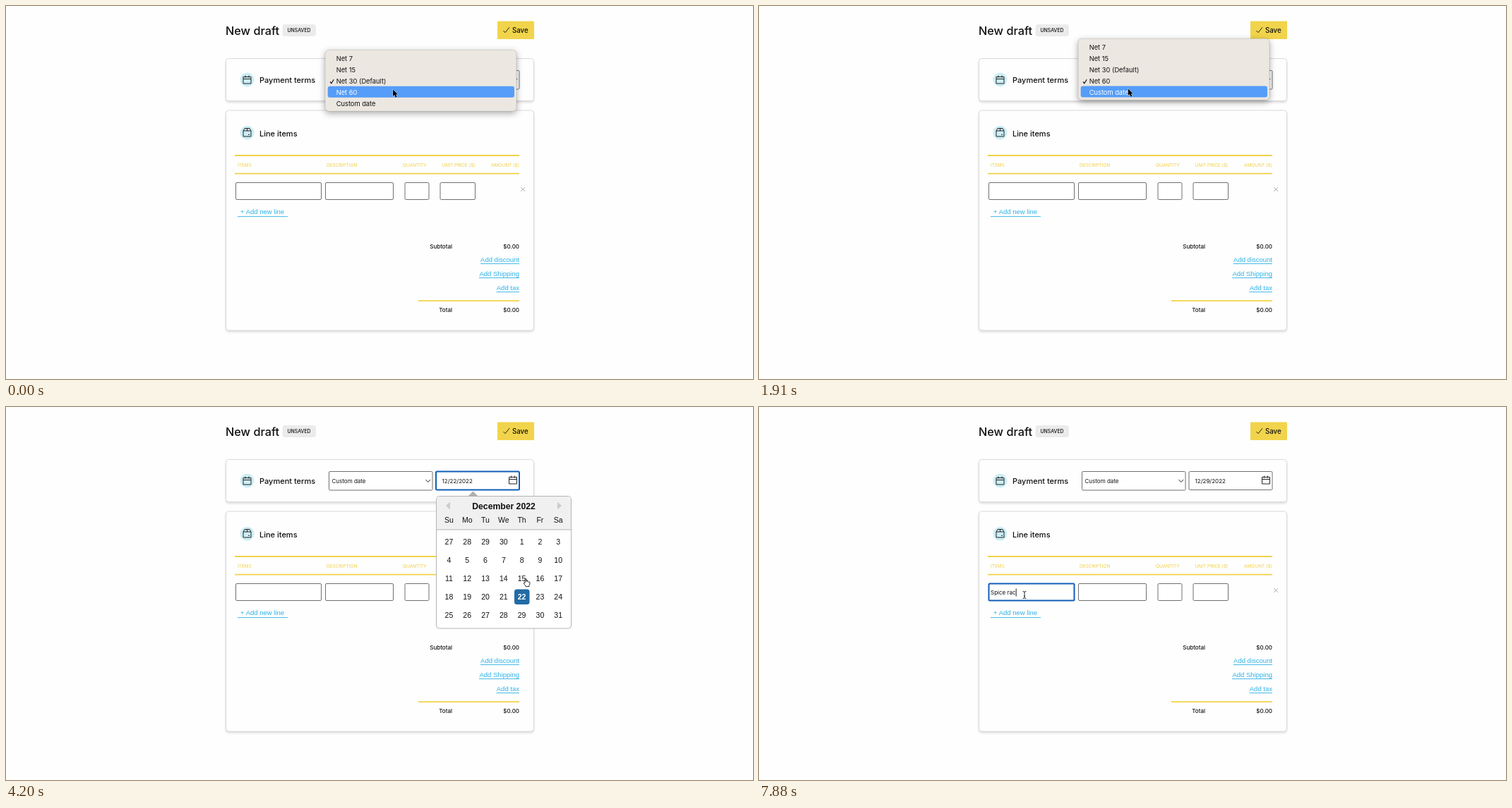
An HTML page that plays this animation: 1058x529 px, repeating every 8000 ms.

```html
<!DOCTYPE html>
<html lang="en">
<head>
<meta charset="utf-8">
<title>New draft</title>
<style>
html, body { margin: 0; width: 100%; height: 100%; overflow: hidden; background: #fefefe; }
svg { display: block; font-family: Inter, sans-serif; fill: #111; }
.arial { font-family: "Liberation Sans", Arial, sans-serif; }
.end { text-anchor: end; }
.mid { text-anchor: middle; }
.line { fill: none; stroke: #222; stroke-width: 1; }
.link { fill: #2fb2e6; font-size: 9.5px; }
.head { fill: #f2cf45; font-size: 6.5px; }
.small { font-size: 8px; font-weight: 500; }
.field { fill: #fff; stroke: #707070; stroke-width: 1; }
.field.hover { stroke: #333; }
.field.focus { stroke: #105fb8; stroke-width: 2; }
.card { fill: #fefefe; stroke: #dadada; filter: drop-shadow(0 2px 1.5px #0002); }
</style>
</head>
<body>
<svg id="stage" width="1058" height="529" viewBox="0 0 1058 529"></svg>
<script>
const LOOP = 8000;
const stage = document.getElementById('stage');

const text = (x, y, str, size, cls = '', extra = '') =>
  `<text x="${x}" y="${y}" class="${cls}" ${size ? `font-size="${size}"` : ''} ${extra}>${str}</text>`;
const rect = (x, y, w, h, r, attrs) =>
  `<rect x="${x}" y="${y}" width="${w}" height="${h}" rx="${r}" ${attrs}/>`;
const path = (d, attrs = 'class="line"') => `<path d="${d}" ${attrs}/>`;
const group = (id, body) => `<g id="${id}">${body}</g>`;
const field = (x, y, w, h, id = '') => rect(x, y, w, h, 1.5, `class="field" id="${id}"`);
const calIcon = (x, y) =>
  path(`M${x} ${y + 2}h11v9.5h-11zM${x} ${y + 5}h11M${x + 3} ${y}v3M${x + 8} ${y}v3`);
const rule = (x, y) => path(`M${x} ${y}H727`, 'stroke="#f1d24a" stroke-width="1.8"');

function link(y, str, width) {
  return text(727, y, str, 0, 'arial link end') +
    path(`M${727 - width} ${y + 2.5}H727`, 'stroke="#2fb2e6" stroke-width=".9"');
}

function page() {
  const heads = [[328, 'ITEMS'], [454, 'DESCRIPTION'], [562, 'QUANTITY'], [617.5, 'UNIT PRICE ($)']];
  return text(311, 41, 'New draft', 16.3, '', 'font-weight="500"') +
    rect(391.5, 26, 47.5, 17, 4, 'fill="#ebebeb"') +
    text(415, 37, 'UNSAVED', 6.9, 'mid', 'font-weight="500"') +
    rect(696, 21.5, 52, 25.5, 1, 'fill="#f1d44b"') +
    path('M704.5 35l2.5 2.7 6-7.5') +
    text(717, 38, 'Save', 9.7, '', 'font-weight="500"') +
    rect(311.5, 74.5, 436, 60, 4, 'class="card"') +
    rect(311.5, 148, 436, 312, 4, 'class="card"') +
    '<circle cx="341.5" cy="104.5" r="10" fill="#cdeef6"/><circle cx="341.5" cy="179.7" r="10" fill="#cdeef6"/>' +
    calIcon(336, 98.5) +
    path('M336 177l2-3.5h7l2 3.5v8h-11zM336 177h11M341.5 173.5v3.5M343 182.3h2') +
    text(359, 109, 'Payment terms', 11, '', 'font-weight="500"') +
    text(359, 184.5, 'Line items', 11, '', 'font-weight="500"') +
    rule(324, 212) + rule(324, 237.6) + rule(584, 418.2) +
    heads.map(([x, s]) => text(x, 228, s, 0, 'head')).join('') +
    text(727, 228, 'AMOUNT ($)', 0, 'head end') +
    field(325.5, 250.5, 121, 24, 'item') + field(452.5, 250.5, 96, 24) +
    field(565, 250.5, 34, 24) + field(615, 250.5, 49.5, 24) +
    path('M729 257l6 6M735 257l-6 6', 'stroke="#aaa" stroke-width=".9"') +
    text(332, 295.3, '+ Add new line', 0, 'arial link') +
    path('M328 298.6H399', 'stroke="#2fb2e6" stroke-width=".9"') +
    text(632, 344, 'Subtotal', 0, 'small end') + text(727, 344, '$0.00', 0, 'small end') +
    link(363, 'Add discount', 55) + link(383, 'Add Shipping', 57) + link(403, 'Add tax', 32.5) +
    text(632, 433.5, 'Total', 0, 'small end') + text(727, 433.5, '$0.00', 0, 'small end') +
    text(328, 266, '', 8, '', 'id="typed"') +
    rect(0, 257.5, .9, 11, 0, 'id="caret" fill="#111"');
}

function selects() {
  return field(457.5, 91.5, 269.5, 26.5, 'select') +
    text(461.5, 107.7, '', 8, '', 'id="chosen"') +
    group('chevron', path('M717.5 103l3.3 3.5 3.3-3.5')) +
    group('date', field(609, 91.5, 118, 26, 'dateBox') +
      text(617.5, 107.5, '', 8, '', 'id="dateText"') + calIcon(712.5, 97.5));
}

function menu() {
  const rows = ['Net 7', 'Net 15', 'Net 30 (Default)', 'Net 60', 'Custom date'];
  return rect(452, 0, 271, 87, 5, 'fill="#ece7e1" stroke="#0003" stroke-width=".6" style="filter:drop-shadow(0 3px 5px #0005)"') +
    rect(455.7, 0, 264.3, 16, 3, 'id="hot" fill="#559df8"') +
    rows.map((s, i) => text(467.7, 15.3 + 16 * i, s, 9.3, 'row')).join('') +
    path('M459 1l1.8 2.4 3.4-5.4', 'id="tick" fill="none" stroke="#111" stroke-width="1.2"');
}

function calendar() {
  const col = i => 627.4 + 25.8 * i;
  let out = rect(609.5, 126.5, 191, 187.5, 4, 'fill="#fff" stroke="#b4b4b4"') +
    path('M610 174V130q0-3 3-3H797q3 0 3 3V174z', 'fill="#f0f0f0"') +
    path('M610 174H800', 'stroke="#b4b4b4"') +
    path('M654.5 126.5l7-7 7 7z', 'fill="#aeaeae"') +
    path('M629 134.5v11l-6-5.5zM781 134.5v11l6-5.5z', 'fill="#ccc"') +
    text(705, 144.6, 'December 2022', 12.2, 'arial mid', 'font-weight="700"') +
    rect(720, 258.5, 21.5, 21.5, 3.5, 'fill="#216ba5"');
  ['Su', 'Mo', 'Tu', 'We', 'Th', 'Fr', 'Sa'].forEach((d, i) => out += text(col(i), 164, d, 10.5, 'arial mid'));
  for (let i = 0; i < 35; i++) {
    const day = i < 4 ? 27 + i : i - 3;
    out += text(col(i % 7), 195.3 + 25.9 * Math.floor(i / 7), day, 10.5, 'arial mid',
      day === 22 ? 'font-weight="700" style="fill:#fff"' : '');
  }
  return out;
}

function cursors() {
  const edge = 'fill="#fff" stroke="#111" stroke-width=".9" stroke-linejoin="round"';
  return group('arrow', path('M0 0V9.6L2.2 7.6 3.8 11.2 5.6 10.4 4.1 7H7z',
      'fill="#000" stroke="#fff" stroke-width=".8" paint-order="stroke"')) +
    group('beam', path('M-2.3-5Q0-5 0-3.7Q0-5 2.3-5M0-3.7V3.7M-2.3 5Q0 5 0 3.7Q0 5 2.3 5M-1 1.6H1')) +
    group('hand', path('M-.9 6.4V.9Q0-.4.9.9V4.4Q2-.0 2.6 4.6Q4 3.8 4.2 5.2Q6 4.6 5.9 6.4V8.2Q5.6 9.6 4.9 10.2V11.6H.2Q-.6 9.8-2.6 7.4Q-3.2 5.6-.9 6.4z', edge));
}

stage.innerHTML = page() + selects() + group('menu', menu()) + group('calendar', calendar()) + cursors();
const $ = id => document.getElementById(id);
const rows = [...stage.querySelectorAll('.row')];
const show = (id, on) => $(id).setAttribute('visibility', on ? 'visible' : 'hidden');
const place = (id, x, y) => $(id).setAttribute('transform', `translate(${x} ${y})`);
// last entry whose time has come
const at = (list, t) => list.findLast(e => e[0] <= t);

const pointer = [
  [0, 548, 118.5, 'arrow'], [620, 548.5, 117], [740, 547.5, 113], [860, 546, 108], [950, 545, 104.5],
  [1310, 541, 108], [1430, 533, 114.5], [1550, 526, 117], [1670, 522.7, 117.5],
  [2440, 535, 114], [2560, 574, 109], [2670, 612, 106, 'beam'], [2780, 632, 104.5, 'beam'], [2900, 638, 104.5, 'beam'],
  [3730, 648, 119], [3850, 672, 146, 'hand'], [3970, 702, 185, 'hand'], [4080, 726, 223, 'hand'],
  [4200, 736, 243, 'hand'], [4320, 739, 255, 'hand'], [4430, 740, 266, 'hand'],
  [4550, 739, 274, 'hand'], [4670, 736, 282, 'hand'], [4790, 732, 287, 'hand'], [4900, 729, 288.5, 'hand'],
  [5020, 728, 288.5], [5620, 708, 288.5], [5740, 620, 287], [5860, 505, 283],
  [5980, 410, 272, 'beam'], [6100, 376, 266.5, 'beam']
];
const fade = [[0, 1], [270, .6], [390, .17], [500, 0], [1070, 1], [2000, .8], [2120, .45], [2200, .15], [2320, 0]];
const keys = [[0, 0], [6810, 1], [7050, 2], [7290, 3], [7410, 4], [7530, 5], [7650, 7], [7770, 8], [7880, 9]];

function draw(t) {
  const second = t >= 1070;
  const custom = t >= 2320;

  const alpha = at(fade, t)[1];
  show('menu', alpha > 0);
  $('menu').setAttribute('opacity', alpha);
  place('menu', 0, second ? 46.3 : 62.3);
  const hot = second && t >= 1430 ? 4 : 3;
  const tick = second ? 3 : 2;
  $('hot').setAttribute('y', 3.7 + 15.9 * hot);
  rows.forEach((r, i) => r.style.fill = i === hot ? '#fff' : '#111');
  place('tick', 0, 12 + 16 * tick);
  $('tick').setAttribute('stroke', tick === hot ? '#fff' : '#111');

  $('chosen').textContent = custom ? 'Custom date' : t >= 500 ? 'Net 60' : 'Net 30 (Default)';
  $('select').setAttribute('width', custom ? 146.5 : 269.5);
  place('chevron', custom ? -123 : 0, 0);

  const picking = t >= 3380 && t < 5020;
  show('date', custom);
  show('calendar', picking);
  $('dateText').textContent = t < 5020 ? '12/22/2022' : '12/29/2022';
  $('dateBox').setAttribute('class', picking ? 'field focus' : t >= 2780 && t < 3380 ? 'field hover' : 'field');

  const typing = t >= 6340;
  const count = at(keys, t)[1];
  $('item').setAttribute('class', typing ? 'field focus' : t >= 5980 ? 'field hover' : 'field');
  $('typed').textContent = 'Spice rac'.slice(0, count);
  show('caret', typing);
  const gap = count === 6 ? 2 : 0;
  $('caret').setAttribute('x', 328.2 + (count ? $('typed').getComputedTextLength() : 0) + gap);

  const [, x, y, kind = 'arrow'] = at(pointer, t);
  for (const id of ['arrow', 'beam', 'hand']) show(id, id === kind);
  place(kind, x, y);
}

const start = performance.now();
function tickFrame() {
  draw((performance.now() - start) % LOOP);
  requestAnimationFrame(tickFrame);
}
tickFrame();
</script>
</body>
</html>
```
